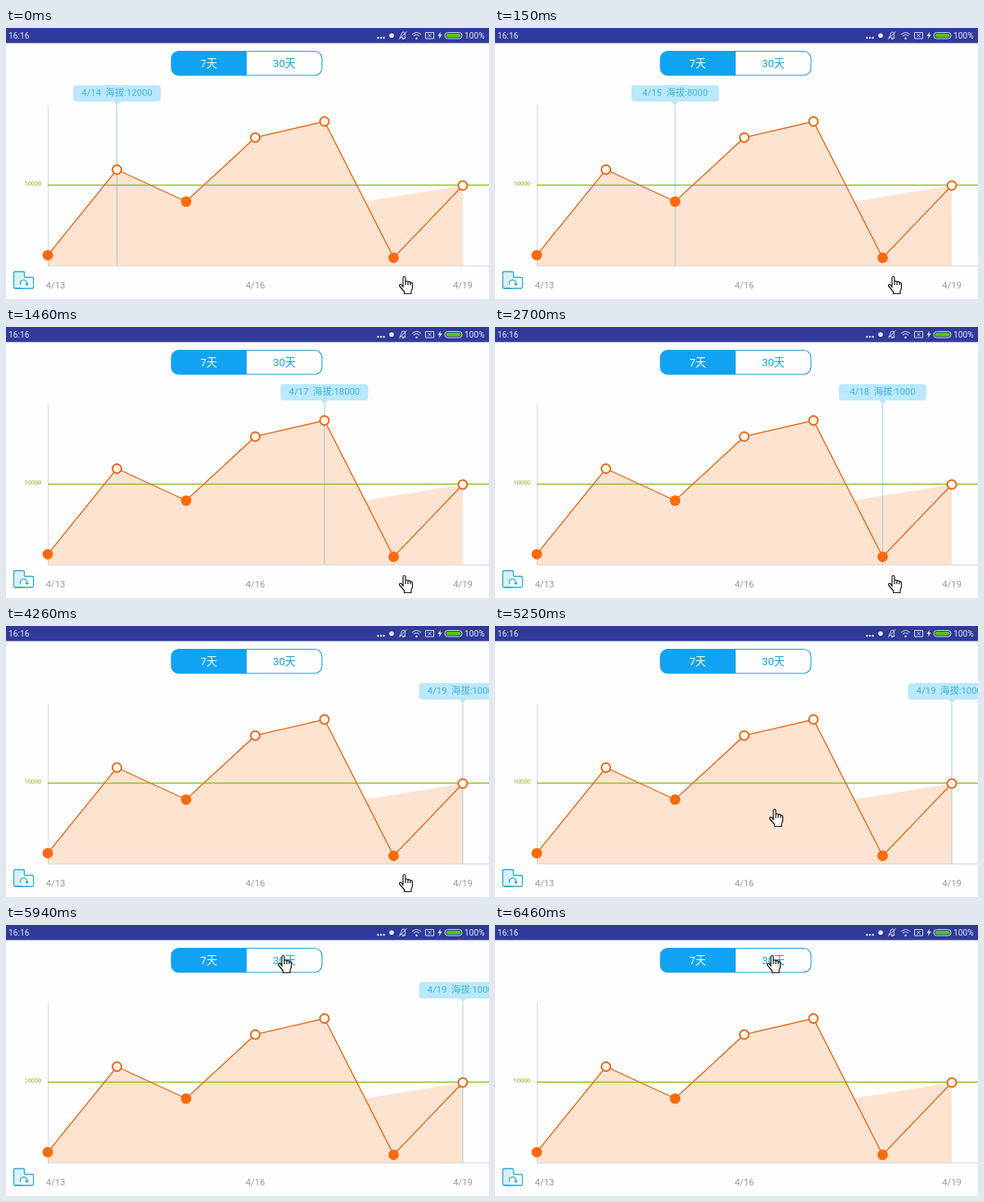
An HTML page for the animation above (8 s loop, 590 px wide and 332 px high).

```html
<!DOCTYPE html>
<html lang="zh">
<head>
<meta charset="utf-8">
<style>
  html, body { margin: 0; width: 100%; height: 100%; overflow: hidden; background: #fefefe; }
  svg { display: block; width: 590px; height: 332px; font-family: Roboto, "Noto Sans CJK SC", "Noto Sans CJK", sans-serif; }
  text { white-space: pre; }
  .mid { text-anchor: middle; }
  .axis { font-size: 11.3px; fill: #999; }
  .tab { font-size: 13.2px; }
  .status { font-size: 10.2px; fill: #e6e8f5; }
  .icons { fill: none; stroke: #d5d9f0; stroke-width: 1; }
</style>
</head>
<body>
<svg viewBox="0 0 590 332">
  <rect width="590" height="332" fill="#fefefe"/>

  <!-- status bar -->
  <rect width="590" height="18.5" fill="#303a9b"/>
  <text class="status" x="3" y="13">16:16</text>
  <text class="status" x="560" y="13">100%</text>
  <g fill="#e6e8f5">
    <circle cx="454.4" cy="12" r="1.2"/><circle cx="458" cy="12" r="1.2"/><circle cx="461.6" cy="12" r="1.2"/>
    <circle cx="471" cy="9.3" r="2.8"/>
    <path d="M531 4.5l-3.5 5.2h2.2l-1 4 4-5.6h-2.4z"/>
    <circle cx="501.5" cy="12.8" r="1.2"/>
  </g>
  <g class="icons">
    <path d="M481 11.5q2-1.5 2-4 .5-3 3-2.5 2.500 .5 1.500 3.500-1 2 .5 4zM484 13.500h2.500M480 13.800l9.500-9.500"/>
    <path d="M496 8q5.500-5 11 0M498 10q3.500-3.200 7 0"/>
    <path d="M512.500 5.500h10v7.500h-10zM515.500 7.200l4 4m0-4l-4 4"/>
    <rect x="536" y="5.500" width="21" height="7.500" rx="3.500"/>
  </g>
  <rect x="537.5" y="7" width="18" height="4.500" rx="2" fill="#51c800"/>

  <!-- range switch -->
  <path d="M294 28.500H211a9 9 0 0 0-9 9V49a9 9 0 0 0 9 9h83z" fill="#10a3f4"/>
  <rect x="202" y="28.500" width="184" height="29.500" rx="9" fill="none" stroke="#1f9fdc" stroke-width="1.1"/>
  <text class="tab mid" x="247.700" y="48" fill="#fff">7天</text>
  <text class="tab mid" x="340" y="48" fill="#189fe0">30天</text>

  <!-- chart -->
  <path d="M51.500 95V291.500H590" fill="none" stroke="#d9d9d9"/>
  <path id="area" fill="#ff690a" fill-opacity=".18"/>
  <path d="M51 192.500H590" stroke="#8cc418" stroke-width="1.400"/>
  <text x="22.500" y="193" font-size="7.400" fill="#84b41c">10000</text>
  <text class="axis mid" x="60.500" y="319">4/13</text>
  <text class="axis mid" x="304.500" y="319">4/16</text>
  <text class="axis mid" x="558" y="319">4/19</text>

  <g id="tip">
    <path d="M0 95V291" stroke="#62b4d2" stroke-opacity=".5" stroke-width="1.200"/>
    <rect x="-53.500" y="70" width="107" height="20" rx="4" fill="#bae8fc"/>
    <path d="M-4 90H4L0 95z" fill="#bae8fc"/>
    <text id="tipText" class="mid" y="83.300" font-size="11.300" fill="#3fb1de"/>
  </g>

  <path id="line" fill="none" stroke="#e8620c" stroke-width="1.300"/>
  <g id="dots"></g>

  <!-- rotate button -->
  <g fill="none" stroke="#2aa9dc" stroke-width="1.300">
    <rect x="9.500" y="298.500" width="13" height="20.500" rx="1.500" fill="#d9f0fa"/>
    <rect x="19" y="305.500" width="14.500" height="13.500" rx="1.500" fill="#fefefe" stroke="none"/>
    <path d="M22.500 305.500H32q1.500 0 1.500 1.500V317.500q0 1.500-1.500 1.500H11"/>
    <path d="M17.500 314.500a4.300 4.300 0 1 1 8 0M23.700 313l1.800 2 2-1.800"/>
  </g>

  <path id="hand" fill="#fff" stroke="#111" stroke-width="1.200" stroke-linejoin="round"
    d="M5 13.500V2q0-1.500 1.500-1.500T8 2V7.200q0-1.200 1.500-1.200T11 7.500q.2-1 1.500-.8T14 8.500q.2-.8 1.300-.6T16.500 9.500V14q0 2-1.500 4v3.500H6.500V19L1 12.500q-1-1.500 .2-2.200T3.500 11zM8 7v4M11 7.500V11M14 8.500V11"/>
</svg>
<script>
const LOOP = 8000;
const days = [
  [51, 278.3], [135.5, 173.5, 12000], [220, 212.6, 8000], [304.5, 134.2, 16000],
  [389, 114.5, 18000], [473.5, 281.5, 1000], [558, 193, 10000]
];
// [start ms, selected day]; 0 hides the callout
const selections = [[0, 1], [150, 2], [1020, 3], [1460, 4], [2700, 5], [4260, 6], [6460, 0]];
// [start ms, left, top]
const pointer = [
  [0, 480, 304], [4660, 479, 304], [5250, 335, 224], [5400, 232, 80],
  [5520, 259, 38], [5670, 302, 33], [5820, 325, 31], [5940, 332, 37]
];

const el = id => document.getElementById(id);
const at = (steps, t) => steps.filter(s => s[0] <= t).pop();
const path = points => 'M' + points.map(p => p.slice(0, 2)).join('L');

el('line').setAttribute('d', path(days));
el('area').setAttribute('d', path([[51, 291], ...days.slice(0, 5), [439, 212.5], days[6], [558, 291]]) + 'z');
el('dots').innerHTML = days.map(([x, y], i) => [0, 2, 5].includes(i)
  ? `<circle cx="${x}" cy="${y}" r="6.4" fill="#ff6a0c"/>`
  : `<circle cx="${x}" cy="${y}" r="5.5" fill="#fff" stroke="#ec6510" stroke-width="1.9"/>`).join('');

function draw(t) {
  const day = at(selections, t)[1];
  el('tip').style.display = day ? '' : 'none';
  if (day) {
    el('tip').setAttribute('transform', `translate(${days[day][0]} 0)`);
    el('tipText').textContent = `4/${13 + day}  海拔:${days[day][2]}`;
  }
  const [, x, y] = at(pointer, t);
  el('hand').setAttribute('transform', `translate(${x} ${y})`);
}

const start = performance.now();
function frame() {
  draw((performance.now() - start) % LOOP);
  requestAnimationFrame(frame);
}
frame();
</script>
</body>
</html>
```
